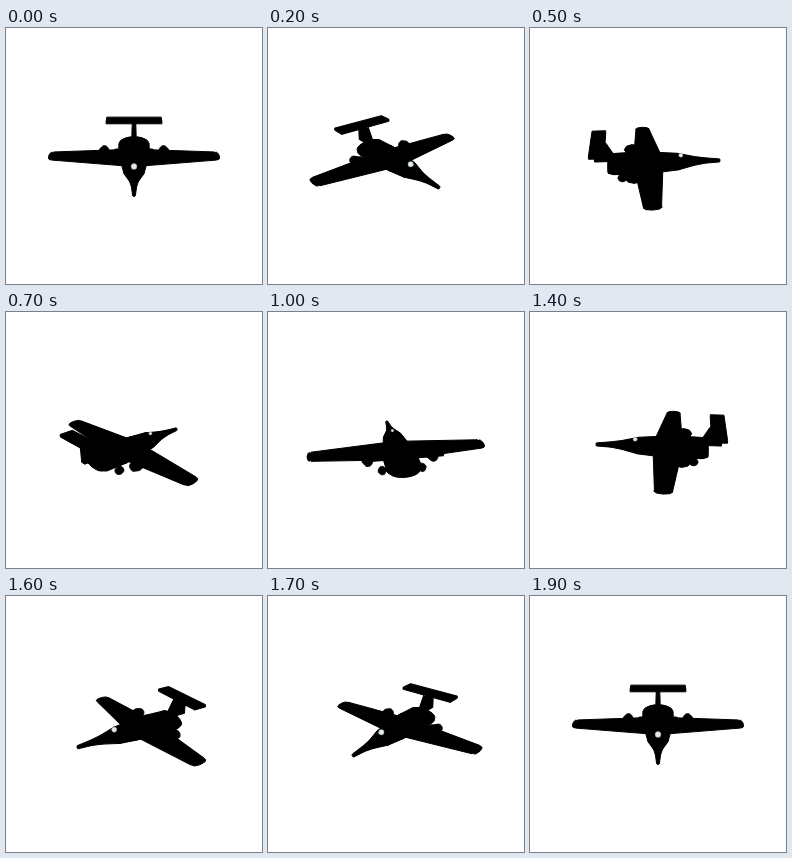
An HTML page that plays this animation: 256x256 px, repeating every 2000 ms.

```html
<!DOCTYPE html>
<html lang="en">
<head>
<meta charset="utf-8">
<title>Turning plane</title>
<style>
  html, body { margin: 0; width: 100%; height: 100%; overflow: hidden; background: #fff; }
  svg { display: block; width: 100vw; height: 100vh; }
</style>
</head>
<body>
<svg viewBox="0 0 256 256">
  <path id="plane" fill="#000" stroke="#000" stroke-width="1" stroke-linejoin="round"/>
  <circle id="glint" fill="#e2ebe7" stroke="#8f9a96" stroke-width=".5"/>
</svg>
<script>
const plane = document.getElementById('plane');
const glint = document.getElementById('glint');

const STEP = 100, STEPS = 20, TURN = 19;
const DIST = 430, TILT = 25.8 * Math.PI / 180;
const ST = Math.sin(TILT), CT = Math.cos(TILT);

// Model axes: x along the span, y up, z towards the nose.
const ring = (x, y, z, rx, ry) => Array.from({ length: 20 }, (_, i) => {
  const a = i * Math.PI / 10;
  return [x + rx * Math.cos(a), y + ry * Math.sin(a), z];
});

const loft = sections => sections.slice(1).map((s, i) => [...ring(...sections[i]), ...ring(...s)]);

const pod = (x, y, z, r, len) => [-1, -0.7, 0, 0.7, 1].flatMap(u => {
  const q = r * Math.sqrt(1 - u * u);
  return ring(x, y, z + u * len, q, q);
});

// A slab edge: front and back z, top and bottom y.
const edge = (x, z0, z1, y0, y1) => [[x, y0, z0], [x, y0, z1], [x, y1, z0], [x, y1, z1]];

const body = loft([
  [0, -7.5, -50, 14, 6.5],
  [0, -7, -45, 16.5, 8.5],
  [0, -7, -22, 16.5, 9.5],
  [0, -7, 2, 13, 9],
  [0, -7, 20, 10, 8],
  [0, -7, 37, 4.3, 4.5],
  [0, -7, 48, 2.4, 2.8],
  [0, -7.5, 63, 1.3, 1.6]
]);

const side = s => [
  [...edge(s * 10, -24, 4, -4, -9), ...edge(s * 84, -19, -4, -4.5, -6.5)],
  pod(s * 85.5, -5.5, -11.5, 2.2, 8),
  pod(s * 31.5, -6.5, -25, 5.3, 8.5),
  pod(s * 19, -13, -36, 3.8, 4.5)
];

const tail = [
  [...edge(-30.5, -66, -52, 14, 16.5), ...edge(30.5, -66, -52, 14, 16.5)],
  [...edge(-1.8, -64, -51, 15, 15), ...edge(1.8, -64, -51, 15, 15),
   ...edge(-2.4, -63, -41, -3, -3), ...edge(2.4, -63, -41, -3, -3)]
];

const parts = [...body, ...side(-1), ...side(1), ...tail];

function project([x, y, z], a) {
  const w = z * Math.cos(a) - x * Math.sin(a);
  const k = DIST / (DIST - w * CT - y * ST);
  return [
    128 + k * (x * Math.cos(a) + z * Math.sin(a)),
    128 + k * (w * ST - y * CT)
  ];
}

function hull(points) {
  const sorted = [...points].sort((p, q) => p[0] - q[0] || p[1] - q[1]);
  const half = list => {
    const out = [];
    for (const p of list) {
      while (out.length > 1) {
        const [a, b] = out.slice(-2);
        if ((b[0] - a[0]) * (p[1] - a[1]) - (b[1] - a[1]) * (p[0] - a[0]) > 0) break;
        out.pop();
      }
      out.push(p);
    }
    return out.slice(0, -1);
  };
  return [...half(sorted), ...half(sorted.reverse())];
}

const toPath = points => 'M' + points.map(p => p.map(v => v.toFixed(2)).join(' ')).join('L') + 'Z';

function draw(step) {
  const a = step % TURN / TURN * 2 * Math.PI;
  plane.setAttribute('d', parts.map(p => toPath(hull(p.map(v => project(v, a))))).join(''));
  const [x, y] = project([0, 0, 23], a);
  glint.setAttribute('cx', x);
  glint.setAttribute('cy', y);
  glint.setAttribute('r', 2.1 + 0.8 * Math.cos(a));
}

let shown = -1;
function tick(now) {
  const step = Math.floor(now / STEP) % STEPS;
  if (step !== shown) draw(shown = step);
  requestAnimationFrame(tick);
}
draw(0);
requestAnimationFrame(tick);
</script>
</body>
</html>
```
